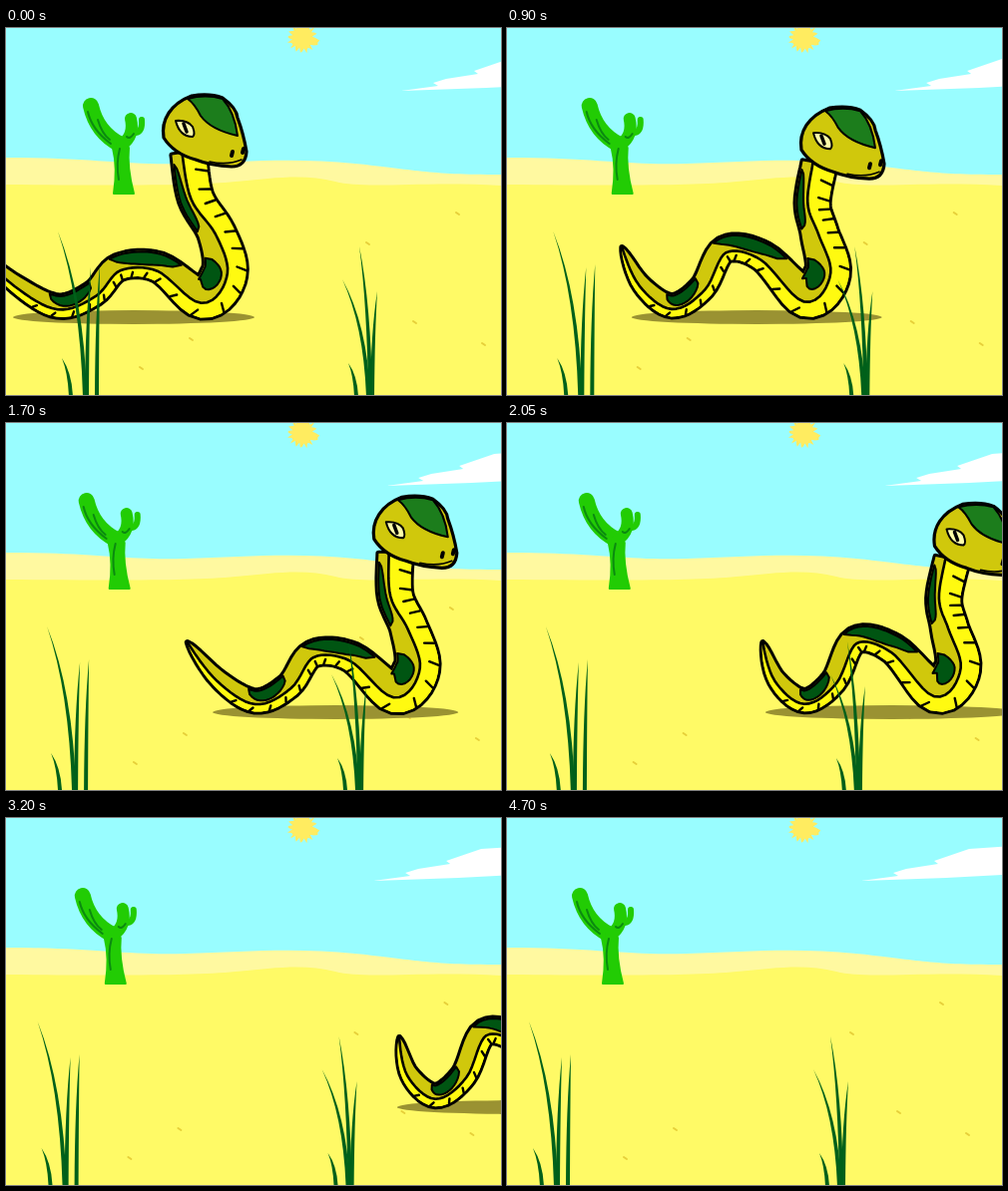
An HTML page for the animation above (4750 ms loop, 496 by 368 pixels).

```html
<!DOCTYPE html>
<html lang="en">
<head>
<meta charset="utf-8">
<title>Desert snake</title>
<style>
  html, body { margin: 0; width: 100%; height: 100%; overflow: hidden; background: #99fdff; }
  svg { display: block; width: 100vw; height: 100vh; }
</style>
</head>
<body>
<svg viewBox="0 0 496 368" preserveAspectRatio="none" stroke-linejoin="round" stroke-linecap="round">
  <rect width="496" height="368" fill="#99fdff"/>
  <path id="sun" fill="#ffec60"/>
  <path id="cloud" fill="#fff" d="M355 63 L392 58 L387 55 L400 51 L432 46 L428 43 L463 31 L540 26 V56 L496 57 L440 60 Z"/>
  <path fill="#fff9a0" d="M0 130 C90 130 120 138 180 136 S290 130 350 136 S420 147 496 147 V368 H0 Z"/>
  <path fill="#fffa66" d="M0 157 C120 158 190 158 230 154 S300 146 330 154 S420 153 496 158 V368 H0 Z"/>
  <g id="specks" stroke="#e6cf3a" stroke-width="2"></g>
  <g id="cactus" fill="none" stroke="#22cc04">
    <path d="M96 166 Q100 140 95 120 H111 Q109 140 116 166 Z" fill="#22cc04" stroke-width="2"/>
    <path d="M103 117 Q79 105 73 78" stroke-width="16"/>
    <path d="M104 117 Q117 108 113 91" stroke-width="12"/>
    <path d="M118 105 Q125 104 124 92" stroke-width="6"/>
    <path d="M70 84 Q74 102 93 116 M80 92 Q84 106 92 112 M102 121 Q98 136 101 152 M109 109 Q112 112 116 106" stroke="#0b8a10" stroke-width="2"/>
  </g>
  <g id="snake">
    <ellipse id="shadow" cy="290" ry="7" fill="#9a9232"/>
    <path id="edge" stroke="#000" stroke-width="6"/>
    <path id="skin" fill="#d0c80c"/>
    <path id="belly" fill="#fffa10"/>
    <path id="ticks" stroke="#000" stroke-width="2.4"/>
    <path id="seam" fill="none" stroke="#000" stroke-width="2.600"/>
    <path id="patches" fill="#005512" stroke="#000" stroke-width="2"/>
    <g id="head" stroke="#000">
      <path d="M158 110 C155 92 165 76 186 68 Q204 65 217 70 Q231 80 232 90 Q238 106 241 124 Q240 139 226 139 Q205 138 190 132 Q168 126 158 110 Z" fill="#d0c80c" stroke-width="3.2"/>
      <path d="M182 71 Q200 66 217 71 Q229 84 232 108 Q205 102 195 88 Q189 76 182 71 Z" fill="#1c7d1c" stroke-width="2"/>
      <path d="M170 93 Q182 92 187 99 Q190 107 187 109 Q174 109 170 93 Z" fill="#ffffa8" stroke-width="2"/>
      <path d="M178 96 L181 104" stroke-width="3.5"/>
      <path d="M227 124 L226 128 M238 121 L237 125" stroke-width="4"/>
      <path d="M204 134 Q222 138 236 132" fill="none" stroke-width="1.6"/>
    </g>
  </g>
  <g id="grass" fill="#00601a"></g>
</svg>
<script>
const LOOP = 4750, STEP = 50, CYCLE = 1200, SPEED = 136 / CYCLE, NECK = 10;
// resting spine, tail tip to neck
const SPINE = [[-32, 220], [10, 257], [52, 279], [88, 266], [113, 240], [153, 240], [196, 271], [219, 245], [211, 206], [190, 170], [183, 125]];

const $ = id => document.getElementById(id);
const set = (id, name, value) => $(id).setAttribute(name, value);
const shift = (id, x, y = 0) => set(id, 'transform', `translate(${x.toFixed(1)} ${y.toFixed(1)})`);
const line = pts => 'M' + pts.map(p => p.map(v => v.toFixed(1)).join(' ')).join('L');
const range = (n, fn) => Array.from({ length: n }, (_, i) => fn(i));
const bump = (u, mid, width) => Math.exp(-(((u - mid) / width) ** 2));
const ramp = (u, mid, slope) => 1 / (1 + Math.exp((mid - u) * slope));

set('sun', 'd', line(range(44, i => {
  const a = i * Math.PI / 22, r = 13 + 3 * Math.sin(i * 2.3) + 6 * bump(i, 2, 1);
  return [297 + r * Math.cos(a), 10 + r * Math.sin(a)];
})) + 'Z');

$('specks').innerHTML = [[345, 216], [461, 317], [118, 341], [168, 312], [435, 186], [392, 295]]
  .map(([x, y]) => `<path d="M${x - 1} ${y - 1}l3 2"/>`).join('');

// blade: tip x, tip y, root x
$('grass').innerHTML = [
  [22, 204, 49], [55, 240, 51], [64, 237, 61], [26, 331, 35],
  [324, 219, 335], [342, 264, 337], [307, 252, 333], [313, 336, 321]
].map(([x, y, root]) => {
  const bx = x + (root - x) * .9, by = y + (368 - y) * .4;
  return `<path d="M${x} ${y}Q${bx - 2} ${by} ${root - 2} 370h4Q${bx + 2} ${by} ${x} ${y}Z"/>`;
}).join('');

const halfWidth = u => 12 * (1 - Math.exp(-1.1 * u)) + 8 * bump(u, 6.6, 1.2) + 5 * ramp(u, 7, 1);
const seamAt = u => -.3 + .75 * ramp(u, 8, 1.3);

// 0 at the start of a cycle, 1 at the far end of the swing
function swing(phase, lag) {
  const c = Math.cos(lag);
  return (c - Math.cos(phase * 2 * Math.PI - lag)) / (1 + c);
}

function along(list, u) {
  const n = list.length - 1, i = Math.min(n - 1, Math.floor(u)), s = u - i;
  const [a, b, c, d] = [-1, 0, 1, 2].map(k => list[Math.max(0, Math.min(n, i + k))]);
  return b + s / 2 * (c - a + s * (2 * a - 5 * b + 4 * c - d + s * (3 * (b - c) + d - a)));
}

function drawSnake(t) {
  const phase = t / CYCLE % 1;
  const surge = swing(phase, .785) ** 2, sway = swing(phase, .925);
  const lift = u => Math.max(0, u - 8) / 2 * sway;
  const xs = SPINE.map(([x], u) => x + 66 * surge * Math.exp(-.7 * u) + 32 * lift(u));
  const ys = SPINE.map(([, y], u) => y - 27 * surge * bump(u, 4.2, 1.1) + 13 * lift(u));

  // point beside the spine: side 1 is the back, -1 the belly
  const beside = (u, side) => {
    const v = Math.min(u, NECK - .01), w = halfWidth(u) * side;
    const dx = along(xs, v + .01) - along(xs, v), dy = along(ys, v + .01) - along(ys, v);
    const len = Math.hypot(dx, dy) || 1;
    return [along(xs, u) + dy / len * w, along(ys, u) - dx / len * w];
  };
  const run = (from, to, side, n = 80) => range(n + 1, i => {
    const u = from + (to - from) * i / n;
    return beside(u, side(u, i / n));
  });

  const under = run(0, NECK, () => -1).reverse(), seam = run(0, NECK, seamAt);
  const body = line([...run(0, NECK, () => 1), ...under]) + 'Z';
  set('edge', 'd', body);
  set('skin', 'd', body);
  set('belly', 'd', line([...seam, ...under]) + 'Z');
  set('seam', 'd', line(seam));

  set('ticks', 'd', range(21, i => {
    const u = 1.5 + i * .4;
    return line([beside(u, -1), beside(u + .06, -1 + (1 + seamAt(u)) * .5)]);
  }).join(''));

  set('patches', 'd', range(4, k => {
    const from = 1.7 + 2.2 * k, to = from + 1.4;
    const inner = (u, s) => .95 - (.7 - seamAt(u)) * Math.max(0, Math.sin(Math.PI * s)) ** .5;
    return line([...run(from, to, () => .95, 16), ...run(from, to, inner, 16).reverse()]) + 'Z';
  }).join(''));

  const left = 7 + 23 * surge, right = 249 + 36 * surge;
  set('shadow', 'cx', (left + right) / 2);
  set('shadow', 'rx', (right - left) / 2);
  shift('head', 40 * sway, 14 * sway);
  shift('snake', t * SPEED);
}

function draw(t) {
  const left = 1 - t / (LOOP - STEP);
  shift('cloud', 41 * left);
  shift('cactus', 12 * left);
  shift('specks', 17 * left);
  shift('grass', 30 * left);
  drawSnake(t);
}

const start = performance.now();
function tick() {
  const t = (performance.now() - start) % LOOP;
  draw(Math.floor(t / STEP) * STEP);
  requestAnimationFrame(tick);
}
tick();
</script>
</body>
</html>
```
